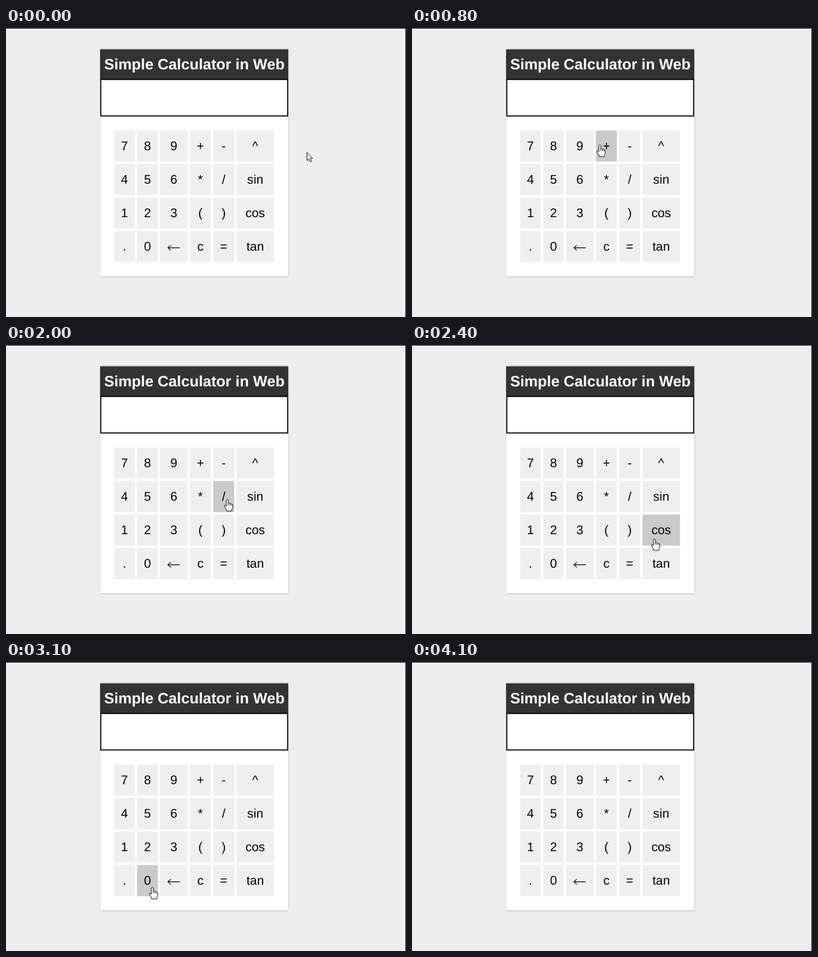
Animation of 608x440 px, one loop 4700 ms. Source, as an HTML page with a canvas:

```html
<!DOCTYPE html>
<html lang="en">
<head>
<meta charset="utf-8">
<title>Simple Calculator</title>
<style>
  html, body { margin: 0; width: 100%; height: 100%; overflow: hidden; background: #eee; }
  canvas { display: block; }
</style>
</head>
<body>
<canvas id="stage" width="608" height="440"></canvas>
<script>
const ctx = document.getElementById('stage').getContext('2d');
ctx.textRendering = 'geometricPrecision';
ctx.textAlign = 'center';

const LOOP = 4700, STEP = 100, EXIT = 41;
const FONT = '"Liberation Sans", Arial, sans-serif';
const ROWS = ['7 8 9 + - ^', '4 5 6 * / sin', '1 2 3 ( ) cos', '. 0 ← c = tan'];
const WIDTHS = [31.5, 31.5, 42, 32, 32, 57];
const GAP = 3.4, PITCH = 51, KEY_HEIGHT = 47.5;

const columnX = c => WIDTHS.slice(0, c).reduce((x, w) => x + w + GAP, 164.3);
const keys = ROWS.flatMap((row, r) => row.split(' ').map((label, c) => ({
  label, x: columnX(c), y: 156 + r * PITCH, w: WIDTHS[c], h: KEY_HEIGHT
})));

// Turning points of the sweep over the rows
const PATH = [
  [0, 457, 189], [8, 285, 178], [12, 183, 181], [15, 171, 217],
  [20, 336, 235], [22, 390, 250], [24, 368, 295], [27, 214, 293],
  [29, 176, 313], [31, 222, 343], [36, 411, 342], [40, 490, 422]
].map(([step, x, y]) => ({ step, x, y }));

const slope = (a, b, axis) => (b[axis] - a[axis]) / (b.step - a.step);

// Harmonic mean of the neighbouring slopes, so the curve never overshoots
function tangent(i, axis) {
  if (i === 0 || i === PATH.length - 1) return 0;
  const before = slope(PATH[i - 1], PATH[i], axis);
  const after = slope(PATH[i], PATH[i + 1], axis);
  return before * after > 0 ? 2 * before * after / (before + after) : 0;
}

function pointerAt(step) {
  const i = Math.max(1, PATH.findIndex(p => p.step >= step));
  const a = PATH[i - 1], b = PATH[i];
  const span = b.step - a.step, u = (step - a.step) / span, v = 1 - u;
  const along = axis => Math.round(
    a[axis] * v * v * (1 + 2 * u) + b[axis] * u * u * (1 + 2 * v) +
    span * u * v * (tangent(i - 1, axis) * v - tangent(i, axis) * u));
  return { x: along('x'), y: along('y') };
}

function box(color, x, y, w, h) {
  ctx.fillStyle = color;
  ctx.fillRect(x, y, w, h);
}

function text(label, x, y, font, color) {
  ctx.font = `${font} ${FONT}`;
  ctx.fillStyle = color;
  ctx.fillText(label, x, y);
}

function drawCard() {
  ctx.save();
  ctx.shadowColor = 'rgba(0, 0, 0, .4)';
  ctx.shadowBlur = 3;
  box('#fff', 143.5, 33, 285.5, 345);
  ctx.restore();
  box('#333', 143, 32.5, 286, 45.5);
  text('Simple Calculator in Web', 286.3, 62.8, 'bold 22.9px', '#fff');
  ctx.strokeStyle = '#000';
  ctx.lineWidth = 1.6;
  ctx.strokeRect(144.1, 78.4, 284, 55.5);
}

function drawBackArrow(x, y) {
  ctx.strokeStyle = '#111';
  ctx.lineWidth = 1.2;
  ctx.stroke(new Path2D(`M${x + 9} ${y}h-18m4.5-4l-4.5 4l4.5 4`));
}

function drawKey(key, hovered) {
  const cx = key.x + key.w / 2;
  box(hovered ? '#cacaca' : '#efefef', key.x, key.y, key.w, key.h);
  if (key.label === '←') drawBackArrow(cx, key.y + 25.6);
  else text(key.label, cx, key.y + 30.2, '19.1px', '#000');
}

const ARROW = new Path2D('M.5 .5V13L3.4 10.3L5.4 14.8L7.4 13.9L5.5 9.6H9Z');
const HAND = new Path2D(
  'M-1 1Q.5-.8 2 1V6Q3.7 5 4.5 6.5Q6.3 5.8 7 7.5Q8.8 7.3 8.7 9.5V12.5' +
  'L7.2 15.5V17.8H-.6V16L-4 11Q-4.6 8.4-2.7 9L-1 10.6Z');
const KNUCKLES = new Path2D('M2 6V9M4.5 6.5V9.3M7 7.5V9.6');

function drawPointer({ x, y }, overKey) {
  ctx.save();
  ctx.translate(x, y);
  ctx.fillStyle = '#fff';
  ctx.strokeStyle = '#222';
  ctx.lineWidth = 1;
  ctx.lineJoin = 'round';
  const shape = overKey ? HAND : ARROW;
  ctx.fill(shape);
  ctx.stroke(shape);
  if (overKey) ctx.stroke(KNUCKLES);
  ctx.restore();
}

function draw(time) {
  const step = Math.floor((time % LOOP) / STEP);
  const pointer = step < EXIT ? pointerAt(step) : null;
  const hovered = pointer && keys.find(k =>
    pointer.x >= k.x && pointer.x < k.x + k.w && pointer.y >= k.y && pointer.y < k.y + k.h);

  box('#2a2a2a', 0, 0, 608, 440);
  box('#eee', 0, 1, 607, 439);
  drawCard();
  keys.forEach(key => drawKey(key, key === hovered));
  if (pointer) drawPointer(pointer, Boolean(hovered));
}

const start = performance.now();
function tick() {
  draw(performance.now() - start);
  requestAnimationFrame(tick);
}
tick();
</script>
</body>
</html>
```
